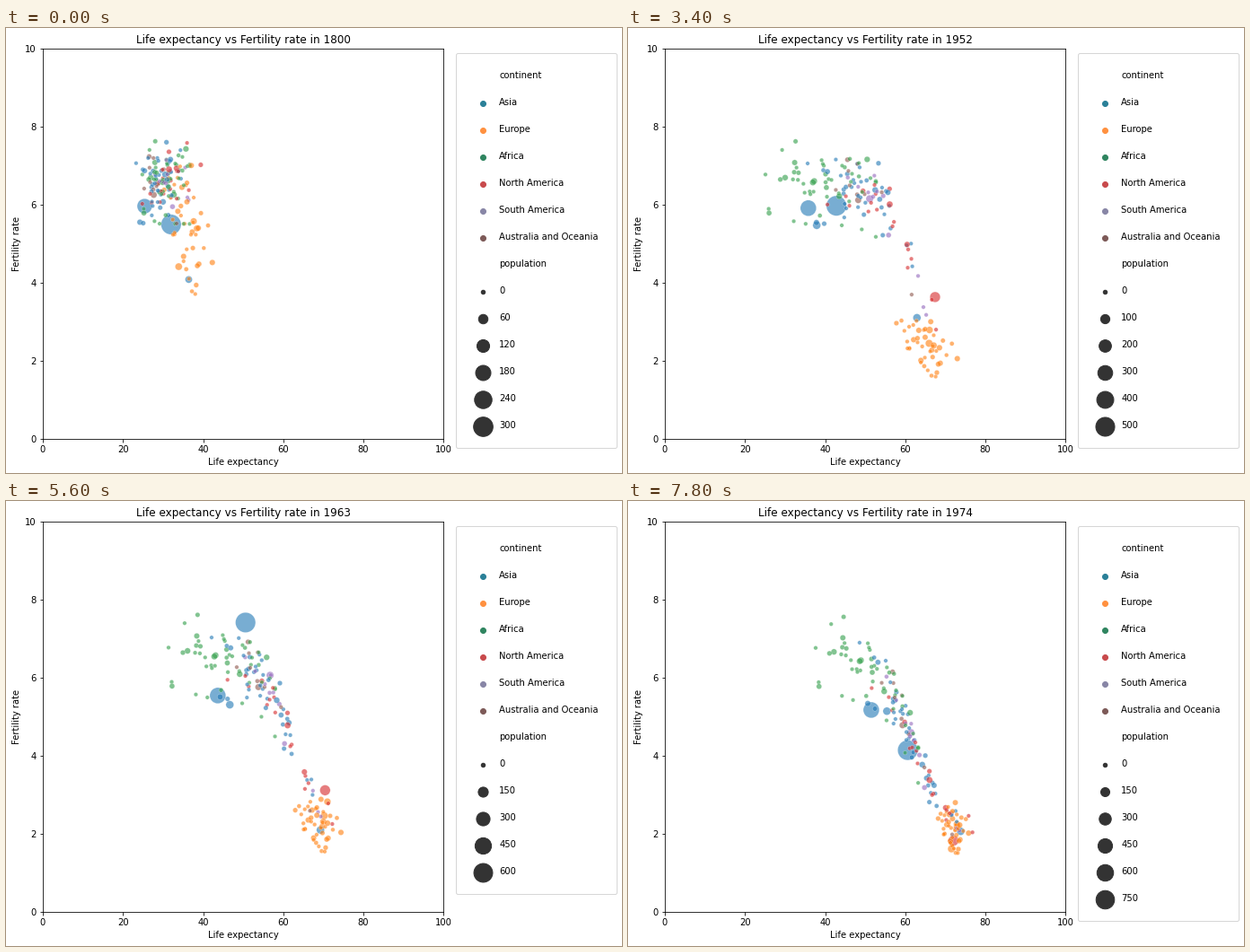
A matplotlib script for the animation above (8000 ms loop, 686x496 px).

```python
import matplotlib.pyplot as plt
import numpy as np
from matplotlib.animation import FuncAnimation
from matplotlib.lines import Line2D
from matplotlib.ticker import MaxNLocator

W, H, DPI = 686, 496, 72
FRAMES, STEP_MS = 40, 200

COLORS = {"Asia": "#1f77b4", "Europe": "#ff7f0e", "Africa": "#2f9e48",
          "North America": "#d62728", "South America": "#9467bd",
          "Australia and Oceania": "#8c564b"}
LEGEND_COLORS = ["#2a8098", "#ff9140", "#2f8560",
                 "#c84a4c", "#8886a6", "#7d5a58"]

# Small countries: how many, and their mean life expectancy at KEYS.
KEYS = [1800, 1920, 1952, 1974]
GROUPS = {"Asia": (40, [29, 29, 49, 61]),
          "Europe": (41, [36, 46, 65, 71.8]),
          "Africa": (50, [31, 31, 39.5, 51]),
          "North America": (19, [31, 33, 55, 65]),
          "South America": (11, [32, 33, 55, 64]),
          "Australia and Oceania": (10, [28, 33, 49, 60])}

# Large countries: share of the top population in 1800 and 1920,
# then a path of (year, life expectancy, fertility rate).
GIANTS = [
    ("Asia", 1, 1, [(1800, 32, 5.5), (1920, 31.9, 5.52), (1952, 42.8, 5.98),
                    (1963, 50.6, 7.43), (1970, 61, 5.76), (1974, 60.6, 4.15)]),
    ("Asia", .54, .62, [(1800, 25.4, 5.97), (1920, 24.6, 5.76),
                        (1952, 35.8, 5.92), (1974, 51.5, 5.18)]),
    ("Asia", .09, .12, [(1800, 36.4, 4.09), (1920, 42, 5.36),
                        (1952, 62.9, 3.11), (1958, 67.2, 2.12),
                        (1974, 73.8, 2.07)]),
    ("Asia", .05, .12, [(1800, 30, 6.08), (1920, 30.2, 5.5),
                        (1952, 37.9, 5.48), (1974, 55.4, 5.15)]),
    ("North America", .02, .24, [(1800, 39.4, 7.03), (1920, 55.3, 3.27),
                                 (1958, 69.7, 3.71), (1974, 72, 1.83)]),
    ("South America", .01, .1, [(1800, 32, 6.2), (1952, 51.1, 6.16),
                                (1963, 56.7, 6.07), (1974, 61.4, 4.6)]),
    ("Europe", .06, .1, [(1800, 38.4, 5.4), (1920, 53.5, 2.41),
                         (1963, 70.2, 2.47), (1974, 71.5, 1.62)]),
    ("Europe", .09, .08, [(1800, 33.9, 4.42), (1920, 51.6, 2.7),
                          (1963, 71, 2.83), (1974, 72.9, 2.2)]),
]
TOP_POP = [(1800, 322), (1840, 412), (1870, 358), (1920, 472),
           (1952, 570), (1963, 690), (1974, 898)]


def year_at(i):
    """Decades up to 1950, single years after that."""
    return 1800 + 10 * i if i <= 15 else 1935 + i


def warp(year):
    """Little changes in the first decades, most in the last."""
    t = (year - 1800) / 120
    return 1800 + 120 * t * t if t < 1 else year


def along(path, t):
    years, *tracks = zip(*path)
    return [np.interp(t, years, track) for track in tracks]


def area(share):
    return 20 + 480 * np.asarray(share)


rng = np.random.default_rng(12)


def make_group(name):
    n, means = GROUPS[name]
    u, v = np.clip(rng.standard_normal((2, n)), -2, 2)
    return name, means, u - u.mean(), v - v.mean(), .07 * rng.random(n) ** 5


groups = [make_group(name) for name in GROUPS]


def group_points(name, means, u, v, t):
    """Fertility falls along an S-curve as life expectancy rises."""
    europe = name == "Europe"
    spreads = [3, 8, 3.8, 1.9] if europe else [3, 3.5, 7, 6.5]
    mid, width, noise = (45, 8, .15) if europe else (62, 4, .08)
    life = np.interp(t, KEYS, means) + np.interp(t, KEYS, spreads) * u
    fert = 2 + 4.6 / (1 + np.exp((life - mid) / width))
    return np.c_[life, fert * (1 + noise * v)]


def state(year):
    t = warp(year)
    big = np.array([along(path, t) for *_, path in GIANTS])
    big[0] -= np.array([15, 4]) * np.exp(-(year - 1960.5) ** 2)  # famine
    big_share = [np.interp(year, [1800, 1920], [a, b])
                 for _, a, b, _ in GIANTS]
    small = np.vstack([group_points(*g[:4], t)
                       for g in groups])
    shares = np.r_[big_share, np.concatenate([g[4] for g in groups])]
    return np.vstack([big, small])[order], area(shares)[order]


# Giants lie below, small countries are mixed on top of them.
names = np.array([g[0] for g in GIANTS]
                 + [g[0] for g in groups for _ in g[2]])
order = np.r_[:len(GIANTS),
              len(GIANTS) + rng.permutation(len(names) - len(GIANTS))]

fig = plt.figure(figsize=(W / DPI, H / DPI), dpi=DPI, facecolor="white")
ax = fig.add_axes([41 / W, 37.8 / H, 446.4 / W, 434.88 / H])
ax.set(xlim=(0, 100), ylim=(0, 10),
       xlabel="Life expectancy", ylabel="Fertility rate")
title = ax.set_title("")

dots = ax.scatter(*np.ones((2, len(names))), alpha=0.6, edgecolors="white",
                  linewidths=0.36, c=[COLORS[n] for n in names[order]])
hue_keys = [ax.scatter([], [], s=36, color=c, lw=1) for c in LEGEND_COLORS]
size_keys = [ax.scatter([], [], color="0.2", lw=1) for _ in range(8)]
blank = Line2D([], [], linestyle="")


def draw_legend(top):
    ticks = MaxNLocator(6).tick_values(0, top)
    values = [int(v) for v in ticks if v <= top]
    for key, value in zip(size_keys, values):
        key.set_sizes([area(value / top)])
    ax.legend([blank, *hue_keys, blank, *size_keys[:len(values)]],
              ["continent", *COLORS, "population", *map(str, values)],
              loc="upper left", bbox_to_anchor=(1.02, 1),
              borderpad=2, labelspacing=2)


def draw(i):
    year = year_at(i)
    points, sizes = state(year)
    dots.set_offsets(points)
    dots.set_sizes(sizes)
    title.set_text(f"Life expectancy vs Fertility rate in {year}")
    draw_legend(along(TOP_POP, year)[0])
    return []


anim = FuncAnimation(fig, draw, frames=FRAMES, interval=STEP_MS,
                     init_func=lambda: draw(0), repeat=True, repeat_delay=0)
plt.show()
```
